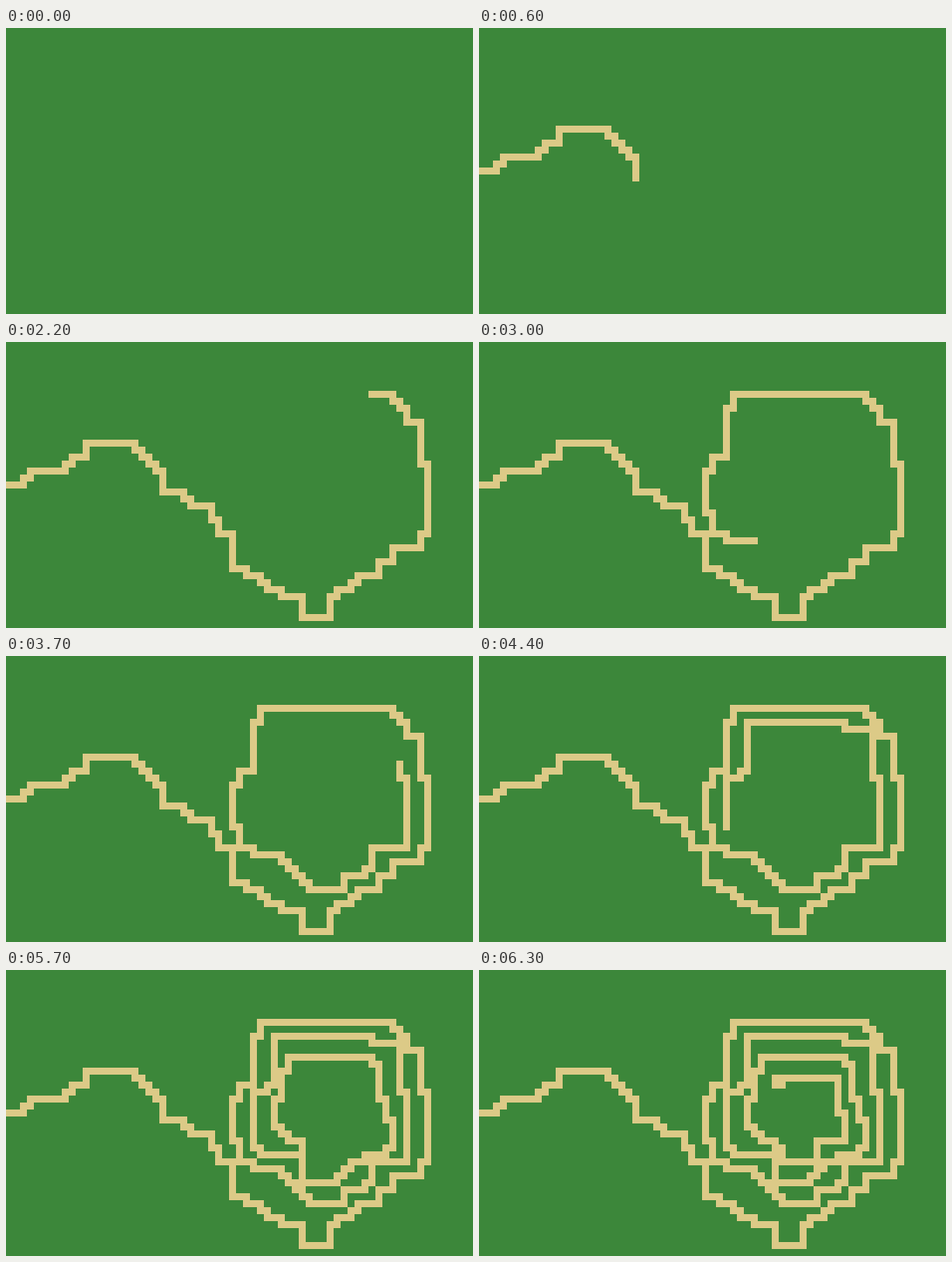
An HTML page for the animation above (6.4 s loop, 536 by 328 pixels).

```html
<!DOCTYPE html>
<html lang="en">
<head>
<meta charset="utf-8">
<title>Winding path</title>
<style>
  html, body { margin: 0; height: 100%; overflow: hidden; background: #3c873a; }
  svg { display: block; }
  path { fill: none; stroke: #dcca87; stroke-linecap: square; }
</style>
</head>
<body>
<svg width="536" height="328" viewBox="0 0 67 41"><path id="trail"/></svg>
<script>
const STEP_MS = 100, STEPS = 64, CELLS_PER_STEP = 6;
const trail = document.getElementById("trail");
const down = n => "v1h1".repeat(n);
const up = n => "v-1h1".repeat(n);

// One unit is one grid cell; the walk enters from beyond the left edge.
trail.setAttribute("d", [
  "M-.5 20.5",
  "h3", up(1), "v-1h5", up(1), "v-1h2v-2h7", down(4),
  "v3h3", down(1), "v1h3v2h1v2h2v5h2v1h2", down(1), "v1h2v1h3v3h4",
  "v-3h1v-1h2", up(1), "v-1h3v-2h2v-2h4v-2h1v-10h-1v-6h-2v-2h-1v-1h-1v-1h-19",
  "v2h-1v7h-2v2h-1v6h1v3h2v1h4", down(4),
  "v1h5v-2h3", up(1), "v-3h5v-10h-1v-7h-4v-1h-14",
  "v7h-1v1h-2v8h1v1h6v4h5", up(2), "v-1h2v-1h3", up(1),
  "v-4h-1v-3h-1v-5h-1v-1h-12",
  "v2h-1v4h-1v4h1", down(1), "v1h2", down(1), "v2h5v-3h4v-4h-1v-5h-9", down(1)
].join(""));

function draw() {
  const step = Math.floor(performance.now() / STEP_MS) % STEPS;
  trail.setAttribute("stroke-dasharray", `${step * CELLS_PER_STEP} 999`);
  requestAnimationFrame(draw);
}
draw();
</script>
</body>
</html>
```
